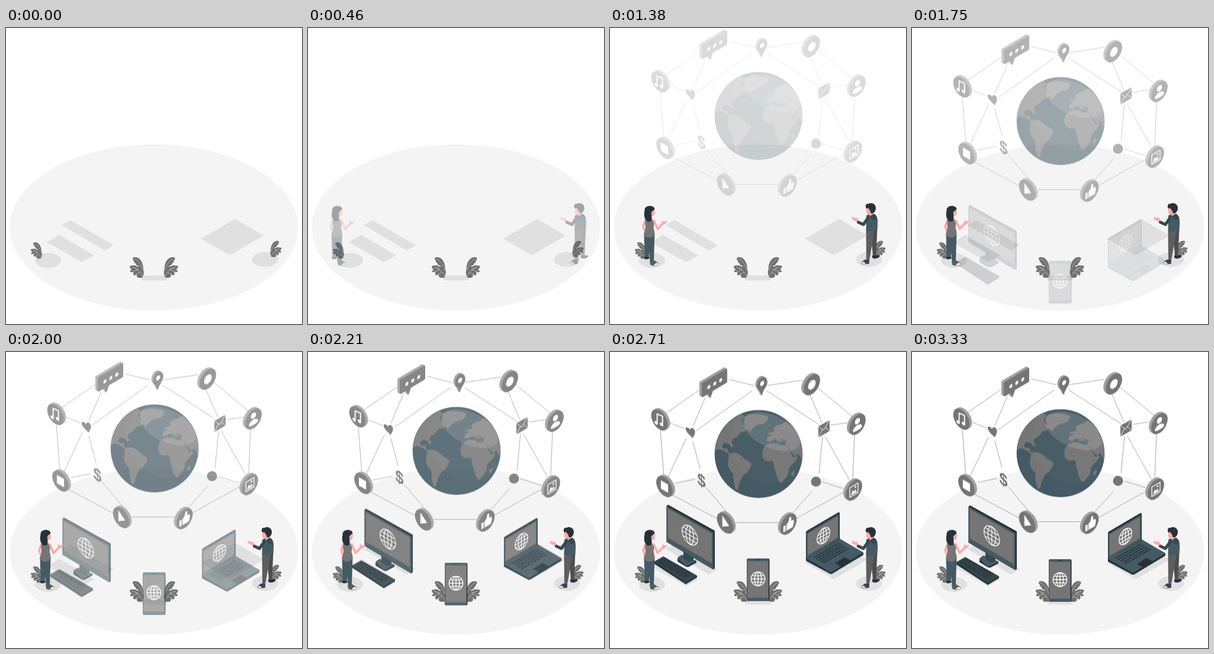
An HTML page that plays this animation: 500 px wide and 500 px high, repeating every 3.37 s.

```html
<!DOCTYPE html>
<html lang="en">
<head>
<meta charset="utf-8">
<title>Connected world</title>
<style>
  html, body { margin: 0; width: 100%; height: 100%; overflow: hidden; background: #fff; }
  svg { display: block; width: 100vw; height: 100vh; }
  .drop { opacity: 0; }
</style>
</head>
<body>
<svg id="stage" viewBox="0 0 500 500" xmlns="http://www.w3.org/2000/svg"></svg>
<script>
const GREY = '#757575', RIM = '#a0a0a0', DARK = '#263238', SLATE = '#455a64', DEEP = '#37474f',
      SKIN = '#ffa8a7', FLOOR = '#e0e0e0', WHITE = '#fff';

const path = (d, fill, extra = '') => `<path d="${d}" fill="${fill}" ${extra}/>`;
const poly = (pts, fill, extra = '') => `<polygon points="${pts}" fill="${fill}" ${extra}/>`;
const line = (d, color, w, extra = '') =>
  `<path d="${d}" fill="none" stroke="${color}" stroke-width="${w}" stroke-linecap="round" stroke-linejoin="round" ${extra}/>`;
const oval = (x, y, rx, ry, fill, extra = '') =>
  `<ellipse cx="${x}" cy="${y}" rx="${rx}" ry="${ry}" fill="${fill}" ${extra}/>`;
const group = (transform, body) => `<g transform="${transform}">${body}</g>`;

// Isometric plane: side 1 rises to the right, side -1 rises to the left.
const iso = (side, x, y, body) => group(`matrix(.866 ${-0.5 * side} 0 1 ${x} ${y})`, body);

// Repeats a shape along its thickness, then sets the front face on top.
function extrude(side, depth, shape) {
  let out = '';
  for (let i = depth; i > 0; i -= 0.5) {
    out += group(`translate(${-side * i} ${-0.575 * i})`, shape(RIM));
  }
  return out + shape(GREY);
}

function disc(side, x, y, glyph) {
  const fx = x + 2 * side, fy = y + 0.8;
  const face = c => iso(side, fx, fy, `<circle r="16" fill="${c}"/>`);
  return extrude(side, 4, face) + iso(side, fx, fy, glyph);
}

// Wire globe shown on the screens.
function web(r) {
  const k = r * 0.87, h = r * 0.5;
  return `<g fill="none" stroke="#fff" stroke-width="1.4">
    <circle r="${r}"/><ellipse rx="${r * 0.5}" ry="${r}"/>
    <path d="M0 ${-r}V${r}M${-r} 0H${r}M${-k} ${-h}Q0 ${-h * 0.75} ${k} ${-h}M${-k} ${h}Q0 ${h * 0.75} ${k} ${h}"/></g>`;
}

const leaf =
  path('M23 21C23 9 17 0 9 0C5 0 4 3 6 5C8 6 6 8 8 9C11 10 9 13 13 14C16 15 16 18 19 19Z', '#707070') +
  path('M22 33C25 27 24 21 21 18C18 14 15 17 13 16C9 13 4 14 0 15C0 19 2 20 4 21C1 22 0 23 1 25C4 26 5 25 7 25C5 28 6 30 8 31C10 31 11 29 12 29C11 32 13 35 16 35C19 35 22 35 22 33Z', '#707070') +
  line('M8 3C14 5 19 12 22 22M4 17C12 19 18 24 22 32M9 18L14 21M5 24L13 22M10 29L17 26', '#e4e4e4', 0.6);
const plant = (x, y, s, flip) => group(`translate(${x} ${y}) scale(${flip ? -s : s} ${s})`, leaf);

function floor() {
  return oval(250, 337, 243.5, 140.5, '#f4f4f4') +
    poly('94,333 109,324.5 182,367 167,376', FLOOR) +
    poly('69,362 90,349.5 149,384 128,395.5', FLOOR) +
    poly('329.5,356 387,322.5 435,350.5 378,384', FLOOR) +
    oval(71, 392.5, 22, 12.5, FLOOR) + oval(437.5, 391, 22, 12.5, FLOOR) +
    `<rect x="229" y="418" width="42" height="8.5" rx="1" fill="${FLOOR}"/>` +
    plant(209, 387, 1, false) + plant(290.5, 387, 1, true) +
    plant(42, 362, 0.79, false) + plant(465.3, 359.5, 0.79, true);
}

function earth() {
  const land = [
    'M176 166C178 140 196 115 222 103L228 108L223 114L225 121L233 125L229 132L221 134L214 142L207 146L205 151L209 157L205 160L202 154L193 152L189 157L192 162L198 161L200 168L206 172L203 173L194 166L184 162Z',
    'M228 108C236 102 252 102 266 107L267 112L261 119L248 122L241 128L236 134L231 128L226 117Z',
    'M201 171C207 166 219 170 224 176C228 181 237 183 239 188C236 196 233 202 226 206C222 212 218 219 217 229L213 232C208 222 209 211 208 204C201 197 197 188 200 180Z',
    'M261 158L271 152L283 153L287 156L299 156L305 168L309 176L317 175C315 184 306 188 302 196C303 207 296 211 292 217C290 220 287 220 285 216C280 208 281 200 277 193C278 187 276 183 272 182C266 184 261 183 258 176C256 170 258 163 261 158Z',
    'M264 149L266 142L272 140L271 135L278 132L276 127L283 122L291 120L297 115C312 126 323 143 325 165L324 181L318 170L313 175L306 168L301 158L295 154L298 150L291 149L285 152L280 146L276 146L271 150Z',
    'M306 207C305 202 309 200 312 199C312 205 309 210 306 207Z',
    'M266 139L270 133L272 137Z'
  ].map(d => path(d, GREY)).join('');
  return '<clipPath id="ball"><circle cx="251" cy="170.7" r="74.3"/></clipPath><g clip-path="url(#ball)">' +
    oval(251, 170.7, 75, 75, SLATE) + land +
    line('M283 147L288 152M288 146L297 149', SLATE, 1.5) +
    oval(276, 149, 73, 72, WHITE, 'opacity=".02"') +
    oval(273, 133, 52, 27, WHITE, 'opacity=".13" transform="rotate(25 273 133)"') + '</g>';
}

function network() {
  const links = 'M202 45L243 55M266 55L325 46M351 59L409 107M337 69L358 118M265 64L353 121M240 64L146 131' +
    'M161 75L140 124M152 62L94 102M101 118L126 128M129 144L98 210M85 131L91 208M140 150L152 195' +
    'M110 220L143 213.5M102 238L183 281M163 228L200 272M213 286.5H284M307 272L341 234M314 280L397 234' +
    'M359 218L394 229M359 142L353 204M364 142L404 214M373 122L401 118M413 139L410 212';
  const note = line('M-4.5 8V-8L6 -9.5V5.5', WHITE, 2.2) + oval(-6.5, 8, 3.2, 2.6, WHITE) + oval(4, 5.5, 3.2, 2.6, WHITE);
  const user = '<circle cy="-5.5" r="5" fill="#fff"/>' + path('M-9 8C-9 -1 9 -1 9 8C6 11 -6 11 -9 8Z', WHITE);
  const photo = '<rect x="-8" y="-8" width="16" height="16" fill="none" stroke="#fff" stroke-width="1.5"/>' +
    poly('-6,6 -2,-1 1,3 3,0 6,6', WHITE) + '<circle cx="3" cy="-4" r="1.6" fill="#fff"/>';
  const thumb = path('M-10 -1H-5.5V9H-10ZM-4 -1L0 -4L2 -11C6 -11 6 -7 5 -3H9C12 -2 10 7 8 9H-4Z', WHITE);
  const play = path('M-5 -9L7 1L-5 8Z', WHITE, 'stroke="#fff" stroke-linejoin="round"');

  const bubble = c => path('M157 50L196 27Q198 26 198 28V48Q198 50 196 51L174 64L169.5 76.5L166 69L157 74.5Q155 75 155 73V53Q155 51 157 50Z', c);
  const pin = c => path('M256.5 72.5C255 64 248.5 63 248.5 55C249 46 256 39 261 41C267 43 267 52 263 58C260 63 258 66 256.5 72.5Z', c);
  const dots = [[167, 57.5], [177, 51.7], [187, 46]].map(p => iso(1, ...p, '<circle r="3" fill="#fff"/>')).join('');
  const heart = path('M0 10C-5 5 -11 1 -11 -4C-11 -10 -3 -10 0 -5C3 -10 11 -10 11 -4C11 1 5 5 0 10Z', GREY);

  return line(links, '#808080', 0.7) + earth() +
    extrude(1, 4, bubble) + dots +
    extrude(1, 3, pin) + iso(1, 257, 51.5, '<circle r="3.9" fill="#fff"/>') +
    disc(-1, 85.5, 112.5, note) +
    disc(1, 339, 53, '<circle r="7.5" fill="#fff"/>') +
    disc(1, 416, 120, user) +
    disc(1, 410, 231, photo) +
    disc(1, 299.5, 288.5, thumb) +
    disc(-1, 196.5, 286.7, play) +
    disc(-1, 94, 225, '<rect x="-7" y="-7" width="14" height="14" fill="#fff"/>') +
    iso(-1, 136.8, 134.5, group('rotate(-22) scale(.86)', heart)) +
    poly('352,124 371,113.5 371,132 352,143', GREY) +
    line('M352 124L361 130.5L371 113.5M352 143L359 129M371 132L364 126', WHITE, 0.9) +
    iso(-1, 154.5, 214.7, `<text text-anchor="middle" y="10.5" font-family="'Liberation Sans', Arial, sans-serif" font-weight="700" font-size="29" fill="${GREY}">$</text>`) +
    `<circle cx="348" cy="217.5" r="8.5" fill="${GREY}"/>`;
}

function monitor() {
  let keys = '';
  for (let i = 0; i < 4; i++) {
    const x = 81 + i * 3.6, y = 355.5 - i * 2.1;
    keys += line(`M${x} ${y}L${x + 46} ${y + 26.6}`, DARK, 2, 'stroke-dasharray="1.6 2.6"');
  }
  return path('M75 355L90 346.5L147 379V382L128 393.5L75 359Z', DARK) +
    path('M75 355L90 346.5L147 379L128 390.5Z', DEEP) + keys +
    path('M114 350Q114 348 121 344L146 354V357L133 364Q130 365 127 363L114 355Z', DARK) +
    path('M114 350L122 344L146 354L132 362Q129 363 126 361Z', SLATE) +
    poly('124,336 141,346 141,353 135,356 124,350', DEEP) +
    path('M95.5 261L98 259L177 303V366.5L174.5 368.5L95.5 322Z', DARK) +
    path('M95.5 261L174.5 306V368.5L95.5 322Z', SLATE) +
    poly('97.8,265.5 172,307.5 172,358 97.8,315', GREY) +
    iso(-1, 134.8, 310.5, web(15.2));
}

function laptop() {
  let keys = '';
  for (let i = 0; i < 5; i++) {
    const x = 345 + i * 4, y = 348 + i * 2.3;
    keys += line(`M${x} ${y}L${x + 41} ${y - 23.6}`, DARK, 2.2, 'stroke-dasharray="1.4 2.9"');
  }
  return path('M331 350L388 317L428 340V344L375 376Q373 377 370 375L331 354Z', DARK) +
    path('M331 349.5L388 316.5L428 340L374 373Q373 373.5 371 372.5Z', SLATE) + keys +
    poly('380,358 396,348 407,353.5 391,364', DARK) +
    path('M331 306Q331 304 333 303L385 272.5Q388 271 388 274V318L331 350.5Z', DARK) +
    path('M331.8 307L386.5 275V318L331.8 350Z', SLATE) +
    poly('334,308 385,278.5 385,314.5 334,344.5', GREY) +
    iso(1, 360.5, 311.5, web(12.5));
}

function phone() {
  return `<rect x="231" y="350" width="38.5" height="72" rx="3" fill="${DARK}"/>
    <rect x="231" y="350" width="37" height="72" rx="3" fill="${SLATE}"/>
    <rect x="232.3" y="354.5" width="35" height="62" fill="${GREY}"/>` +
    line('M246 352.3H253', DARK, 1) +
    group('translate(250 384.5)', web(11.7));
}

function woman() {
  return line('M60 325L56 335L60 346', SKIN, 3.6) +
    path('M58 386L58 390Q62 392 67 389L65 385Z', DARK) +
    path('M67 393L68 400Q74 403 80 400Q83 398 80 396L74 392Z', '#5c5c5c') +
    path('M77 397L81 396.5Q83 399 80 400.5Q76 402 73 401Z', WHITE, `stroke="${DARK}" stroke-width=".5"`) +
    path('M57.5 346L58.5 386Q61 388 65.5 386L69 350Z', SLATE) +
    path('M63 350L67.5 393Q71 395 74 392L75.5 346Z', SLATE) +
    path('M59 326C64 321 73 321 75 327L73.5 338C76 344 76 349 73 352C67 356 60 354 57 349L60 338Z', GREY) +
    line('M74 325L80.5 339.5L89 330.5', SKIN, 3.6) +
    path('M87 330L89 323.5L90.5 327L97 325.5L95 329L90 333Z', SKIN) +
    path('M67 306H75C77 311 76 317 71 318L72 324L65 326Z', SKIN) +
    path('M58.5 308C58 300 69 299 73 302C76 304 76 307 73 308L70 311C69 314 71 316 70 319C71 325 70 327 66 327C60 327 56 320 58.5 308Z', DARK);
}

function man() {
  return path('M443 384L454 384Q457 386 453 388Q447 391 443 388Z', DARK) +
    path('M431 391L438 390.5V398Q430 400 425 398Q424 395 431 391Z', DEEP) +
    path('M425 396L428.5 394.5L433 398.5Q427 399.5 424.5 397.5Z', WHITE, `stroke="${DARK}" stroke-width=".5"`) +
    path('M440 341L444 384Q447 386 449.5 384L451.5 338Z', '#4d4d4d') +
    path('M432.5 341L433 390Q435 392 438.5 390L447 341Z', '#5e5e5e') +
    path('M433 317C438 313 448 313 451 319C453 326 452 334 451.5 341C445 344 436 344 432.5 342Z', SLATE) +
    path('M439 314C445 311 451 315 450 322C446 327 440 324 439 314Z', DEEP) +
    path('M420 331L416.5 327L408 322.5L409.5 318.5L413 321L417 320L420 326Z', SKIN) +
    line('M436.5 320L428 332L419.5 328', DEEP, 5) +
    path('M433 304L433 312Q435 316 438 314.5L439 318L445 314L443 303Z', SKIN) +
    path('M433 305C430 300 433 296 437 297C441 294 449 297 449 304C449 310 445 314 441 313L439 308L436 304Z', DARK);
}

// [drawing, start ms, length ms, shift x, shift y]
const parts = [
  [network, 655, 2700, 0, -30],
  [monitor, 1445, 1310, 0, 50],
  [laptop, 1515, 1235, 0, 59],
  [phone, 1445, 1310, 0, 54],
  [woman, 0, 1350, -30, 0],
  [man, 0, 1350, 30, 0]
];
const LOOP = 3370, EASE = 'cubic-bezier(.36,-.01,.5,1.38)';
const stage = document.getElementById('stage');
stage.innerHTML = floor() + parts.map(p => `<g class="drop">${p[0]()}</g>`).join('');

const begin = document.timeline.currentTime || 0;
stage.querySelectorAll('.drop').forEach((el, i) => {
  const [, start, length, x, y] = parts[i];
  const away = { opacity: 0, transform: `translate(${x}px, ${y}px)` };
  const home = { opacity: 1, transform: 'translate(0px, 0px)' };
  el.animate([
    { ...away, offset: 0 },
    { ...away, offset: start / LOOP, easing: EASE },
    { ...home, offset: (start + length) / LOOP },
    { ...home, offset: 1 }
  ], { duration: LOOP, iterations: Infinity }).startTime = begin;
});
</script>
</body>
</html>
```
